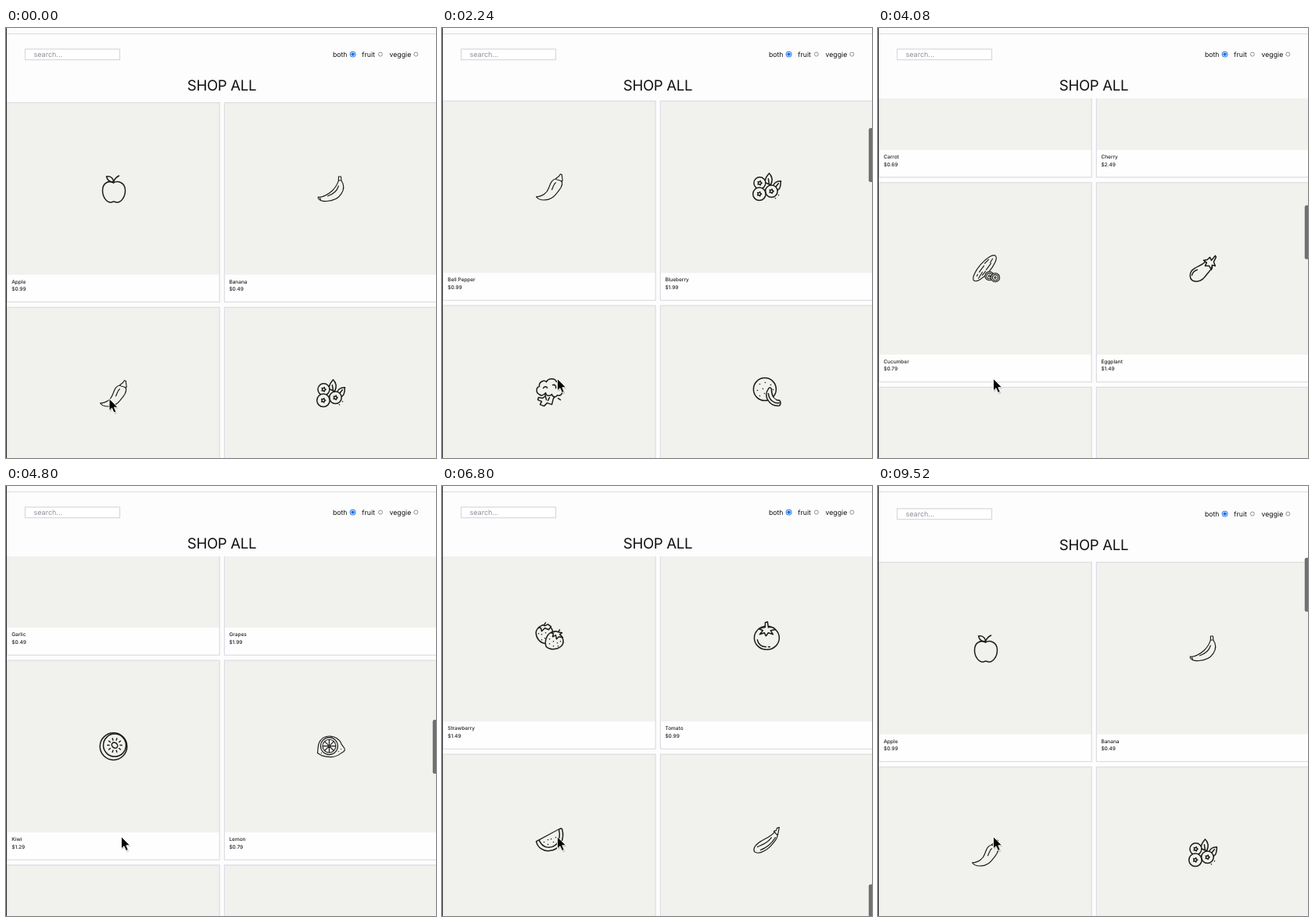
An HTML page for the animation above (9.6 s loop, 550 px wide and 550 px high).

```html
<!DOCTYPE html>
<html lang="en">
<head>
<meta charset="utf-8">
<title>Shop all</title>
<style>
  html, body { margin: 0; width: 100%; height: 100%; overflow: hidden; background: #fdfdfd; }
  svg { display: block; width: 550px; height: 550px; }
  text { font-family: Inter, Roboto, "Liberation Sans", sans-serif; fill: #111; text-rendering: geometricPrecision; }
  .label { font-size: 8.7px; }
  .item { font-size: 6.5px; font-weight: 500; fill: #222; }
  .icon { fill: #f1f1ed; stroke: #1c1c1c; stroke-width: 1.15; stroke-linecap: round; stroke-linejoin: round; }
  .bold { stroke-width: 1.5; }
</style>
</head>
<body>
<svg viewBox="0 0 550 550">
  <defs><clipPath id="view"><rect y="90" width="550" height="500"/></clipPath></defs>
  <rect width="550" height="550" fill="#fdfdfd"/>
  <g id="page">
    <rect x="24.5" y="27" width="121" height="13.6" fill="#fff" stroke="#d9dadf" stroke-width="1.3"/>
    <text x="35.5" y="36.8" style="font-size:9px;fill:#8c9099">search...</text>
    <text class="label" x="418" y="36.8">both</text>
    <text class="label" x="455.3" y="36.8">fruit</text>
    <text class="label" x="490.6" y="36.8">veggie</text>
    <circle cx="443.6" cy="33.6" r="3.4" fill="#fff" stroke="#3b82e8" stroke-width="1.1"/>
    <circle cx="443.6" cy="33.6" r="2.2" fill="#1c6fe6"/>
    <g fill="#fff" stroke="#777" stroke-width=".8">
      <circle cx="478.9" cy="33.6" r="2.5"/>
      <circle cx="524.3" cy="33.6" r="2.5"/>
    </g>
    <text x="276" y="80" text-anchor="middle" style="font-size:18.6px;letter-spacing:-.32px">SHOP ALL</text>
    <g clip-path="url(#view)"><g id="list"></g></g>
    <rect id="thumb" x="545.8" width="8" height="69" rx="2.5" fill="#707070"/>
  </g>
  <path d="M0 7.5H550" stroke="#dcdce0" stroke-width="1.2"/>
  <rect width="1" height="550" fill="#2c2c30"/>
  <g id="cursor">
    <path d="M1 2V17L4.6 13.8L7.2 20L10 18.8L7.4 12.8H12Z" fill="#000" opacity=".16"/>
    <path d="M0 0V15.4L3.5 12.2L6 18L8.8 16.8L6.3 11.2H11Z" fill="#050505" stroke="#fff" stroke-width=".9"/>
  </g>
</svg>
<script>
const LOOP = 9600, STEP = 80, PITCH = 261.8, TOP = 95.5;
const $ = id => document.getElementById(id);

// Path helpers
const oval = (x, y, rx, ry = rx, tilt = 0) => {
  const a = tilt * Math.PI / 180, dx = rx * Math.cos(a), dy = rx * Math.sin(a);
  const arc = s => `A${rx} ${ry} ${tilt} 0 1 ${x + s * dx} ${y + s * dy}`;
  return `M${x - dx} ${y - dy}${arc(1)}${arc(-1)}Z`;
};
const dots = (...xy) => xy.map((v, i) => i % 2 ? '' : `M${v} ${xy[i + 1]}h.1`).join('');
const spokes = (x, y, r0, r1, n) => Array.from({ length: n }, (_, i) => {
  const a = i / n * 2 * Math.PI, c = Math.cos(a), s = Math.sin(a);
  return `M${x + r0 * c} ${y + r0 * s}L${x + r1 * c} ${y + r1 * s}`;
}).join('');
const berry = (x, y, r) => [oval(x, y, r), oval(x, y, 1.9) + spokes(x, y, 1.9, 2.8, 5)];
const grape = (x, y) => oval(x, y, 4.6);

const items = [
  ['Apple', 0.99, [
    'M0-8C-5-11-14-9-14 2C-14 11-8 17-4 17C-2 17-1 16 .5 16C2 16 3 17 5 17C9 17 15 11 15 2C15-9 5-11 0-8Z',
    'M0-9C1-12 3-15 7-17', 'M0-9C-5-9-8-12-9-16C-4-17 0-14 0-9Z'], 'bold'],
  ['Banana', 0.49, [
    'M10-16H13L13.5-11C21 0 12 15-5 15.5C-11 16-17 14-16 10C-12 11-4 8 2 2C8-4 9-8 10-11Z',
    'M10-4C8 3 2 7-4 9M10-11H13M-14 11L-13 14']],
  ['Bell Pepper', 0.99, [
    'M9-11C2-10 1-4-1 1C-3 7-9 12-17 12C-13 18 1 18 8 9C13 3 17-1 16-7C15-11 12-12 9-11Z',
    'M8-11C10-13 12-13 14-17L16-16C15-14 18-10 16-7C14-10 11-8 8-11Z', 'M8-6C5-4 5-1 3 3']],
  ['Blueberry', 1.99, [
    'M-2-6C-3-12 1-15 3-18C7-14 8-9 5-3Z', 'M8-1C9-6 13-8 18-8C18-3 17 3 13 4Z', 'M3-4L2-11M11 0L15-5',
    ...berry(-9, -5.5, 7.5), ...berry(6, 5, 7.8), ...berry(-9.5, 8.5, 8.2), dots(11, 14, 15, 10)], 'bold'],
  ['Broccoli', 1.49, [
    'M-7-1L-5 5L-9 8L-14 7L-15 10L-10 12L-12 16L-7 18L-3 14L3 16L5 8L10 3Z',
    'M-13 3C-18 1-17-6-13-7C-14-13-7-16-4-13C-1-18 7-18 9-13C14-15 18-9 15-5C18-1 16 6 10 4C9 7 4 7 3 3C0 6-4 5-5 1C-8 5-11 5-13 3Z',
    'M-8-5C-6-8-3-7-3-5M4-9C7-10 9-7 8-5M-5 6L-4 10M0 7L-2 11M11 8L14 10'], 'bold'],
  ['Cantaloupe', 2.99, [
    oval(-2.5, -3.5, 14.5), dots(-9, -10, -2, -12, 5, -9, -12, -2, -5, -4, -9, 5, -3, 2, 8, -3),
    'M2-4C-5 6 4 19 16 17.5C18.5 15 18 12 16 10.5C9 11 6 4 6-4C5-6 3-6 2-4Z', 'M2 2C3 10 9 15 16 14'], 'bold'],
  ['Carrot', 0.69, [
    'M5-10C0-10-6 0-16 15C-15 17-14 17-13 16C0 9 10 2 11-4C11-8 8-10 5-10Z',
    'M7-9C5-14 8-17 9-17C11-14 10-11 9-8C12-13 16-12 17-11C15-8 12-6 9-8', 'M-4 0L0 3M0-5L4-2M-8 6L-5 8']],
  ['Cherry', 2.49, [
    oval(-8, 9, 8), oval(8, 8, 8), 'M-8 2C-6-7-1-13 4-16C3-9 5-3 8 1', 'M4-16C10-18 15-14 16-10C10-9 6-11 4-16Z']],
  ['Cucumber', 0.79, [
    oval(-1, -1, 21, 7, -49), 'M-9 12L-4 4M-8 4L-2-4M1 1L7-7M-1-7L4-12M6-8L9-13M-11 9L-10 7M-4 8L0 3',
    oval(5, 9, 5.6), oval(5, 9, 3.6), oval(5, 9, 1.2), oval(12.5, 11, 5.6), oval(12.5, 11, 3.6), oval(12.5, 11, 1.2)]],
  ['Eggplant', 1.49, [
    'M3-9C-1-5-5-4-10-1C-19 4-18 16-8 16C1 16 4 7 12-1L12-7Z',
    'M1-11L6-12L9-15L11-11L16-17L17-15L14-9L16-4L12-5L11 1L8-4L3-4L5-8Z', 'M-14 8C-13 4-10 2-7 1'], 'bold'],
  ['Garlic', 0.49, [
    'M-2-16C-1-8-14-5-14 5C-14 13-6 15 0 15C6 15 14 13 14 5C14-5 1-8 3-16Z', 'M0-9C-6 0-6 10 0 15C6 10 6 0 0-9']],
  ['Grapes', 1.99, [
    grape(-9, -5), grape(0, -5), grape(9, -5), grape(-5, 3), grape(5, 3), grape(0, 11),
    'M0-10V-16', 'M0-12C4-18 10-17 12-14C8-10 4-10 0-12Z']],
  ['Kiwi', 1.29, [
    oval(0, -.5, 17.3), oval(1.5, -2, 14.5), oval(1.5, -2, 4, 3.2, 40), spokes(1.5, -2, 7, 9.2, 10)], 'bold'],
  ['Lemon', 0.79, [
    'M-17 8C-16 3-17-2-14-7C-8-17 8-15 13-5C14-1 18 0 18 4C17 7 14 7 12 9C4 15-6 13-12 11Z',
    oval(-2, -1, 11), oval(-2, -1, 8.4), spokes(-2, -1, 1, 8, 8), dots(13, 3, 10, 6, -12, 8)]],
  ['Onion', 0.69, [
    'M-8-17H-5C-5-10 9-7 9 4C9 12 1 15-6 15C-13 15-17 10-17 4C-17-6-8-9-8-17Z', 'M-12-1C-14 4-13 8-11 10M-6-8L-7-4',
    'M15-9C13-4 18 0 17 7C16 13 11 16 6 16C0 16-4 11-3 6C-1-1 9-2 15-9Z',
    oval(7, 6, 7.2, 6.6), oval(7, 6.4, 4.4, 3.9), oval(7, 6.6, 1.5), 'M-7 15L-8 17M-5 15V17'], 'bold'],
  ['Orange', 0.79, [
    oval(-4, 1, 13.5), 'M-9-11C-13-15-9-18-4-16C0-18 3-15 0-13C-3-10-6-10-9-11Z',
    dots(-12, -1, -9, 3, -12, 6, -6, 7, -8, 11, -5, 0, -2, 11), 'M1-6C4-5 6-3 7 0',
    'M-1 16L15 5C19 10 17 17 11 18C6 19 2 18-1 16Z', 'M4 15L13 9C15 13 12 16 9 16C7 16 5 16 4 15ZM9 12L11 15']],
  ['Pear', 1.29, [
    'M0-9C-5-9-5-4-6-1C-7 3-10 5-10 9C-10 15-5 18 0 18C5 18 10 15 10 9C10 5 7 3 6-1C5-4 5-9 0-9Z',
    'M0-9C0-12 1-14 3-15', 'M-4-13C0-18 4-17 9-17C8-12 4-10 1-12', 'M7 9C7 12 5 14 3 15'], 'bold'],
  ['Pineapple', 1.99, [
    'M-8-5L-12-8L-6-9L-11-14L-4-12L0-18L4-12L11-14L6-9L12-8L8-5Z', 'M-4-6L0-12L4-6',
    'M-7-5H7C11-1 11 11 8 15C5 18-5 18-8 15C-11 11-11-1-7-5Z',
    'M-4-5L10 9M3-5L10 2M-9 0L7 16M-10 7L0 17M4-5L-10 9M-3-5L-10 2M9 0L-7 16M10 7L0 17'], 'bold'],
  ['Plum', 0.99, [
    'M0-9C-7-12-13-6-12 3C-11 11-5 16 0 16C6 16 11 10 11 3C11-7 5-11 0-9Z',
    'M0-9C3-4 4 3 1 10M0-9C0-12 2-14 4-15', 'M2-10C2-16 7-17 13-16C12-10 8-7 2-10Z']],
  ['Potato', 0.59, [
    'M-13 10C-19 7-18-2-13-4C-12-13-3-18 4-13C10-9 9-1 6 3C0 10-8 13-13 10Z',
    'M-6 9C-8 2 0-3 7-2C14-4 19 1 17 8C15 14 8 15 3 14C-1 14-5 13-6 9Z',
    dots(-8, -7, -2, -11, 2, -7, -12, 2, -9, 6, -4, -2) + 'M1 5L4 4M9 2L12 3M5 10L8 9M12 9L13 7']],
  ['Pumpkin', 2.49, [
    oval(-7, 4, 9, 12), oval(7, 4, 9, 12), oval(0, 4, 7, 12), 'M-2-8L0-16L4-15L2-8Z']],
  ['Raspberry', 2.99, [
    'M-11-7C-15 4-5 17 0 17C5 17 15 4 11-7Z', grape(-6, -2), grape(6, -2), grape(0, 5), 'M-11-7L-5-12L0-8L5-12L11-7L0-4Z']],
  ['Strawberry', 1.49, [
    'M-13-11C-19-8-18 0-14 5C-11 9-6 10-2 10C4 7 6-3 3-9C0-14-8-14-13-11Z',
    'M-7-14L-5-17M-14-11L-9-14L-6-13L-2-15L2-12L-1-8L-6-10L-10-6L-11-10Z', dots(-14, -3, -10, -2, -10, 5, -6, 3, -5, -4),
    'M1-4C-4-1-7 8-4 14C1 19 12 17 16 12C20 6 16-1 10-4C7-6 4-6 1-4Z',
    'M11-5L13-8M2-4L8-6L11-5L16-4L13-2L17 2L12 1L9 4L8-1L4 1L5-3Z', dots(0, 4, 0, 10, 5, 7, 5, 13, 10, 9, 11, 13, 14, 7)], 'bold'],
  ['Tomato', 0.99, [
    oval(0, 2.5, 16, 15), 'M-10-9C-6-11-4-11-2-11L-2-17L1-18L2-11C5-12 9-11 11-8L5-7L8-2L2-4L-1 0L-3-4L-9-2L-5-7Z',
    'M-12 5C-11 11-6 14-1 14M2 14H4'], 'bold'],
  ['Watermelon', 2.99, [
    'M-17 1L14-15.5L16-15C20-2 13 12 0 13C-8 14-15 9-17 1Z', 'M-13 0C-9 9 0 11 7 6C13 2 14-7 12-14',
    dots(-7, 2, -2, 5, 2, -2, 5, 2, 8, -4, -2, -1)], 'bold'],
  ['Zucchini', 0.99, [
    'M10-11C6-6 1-4-6 0C-13 4-18 9-16 14C-12 18-2 14 4 8C10 2 14-3 14-8Z',
    'M9-12L12-13L13-16L16-17L15-12L14-7C12-8 11-10 9-12Z', 'M6-4C1 3-5 5-12 8M11-4C6 4 0 9-8 12']],
];

$('list').innerHTML = items.map(([name, price, paths, look = ''], i) => {
  const x = i % 2 ? 279.4 : 1.2, y = TOP + (i >> 1) * PITCH, mid = i % 2 ? 136 : 136.3;
  return `<g transform="translate(${x} ${y})">
    <rect width="272" height="255" fill="#fefefe"/>
    <rect width="272" height="220" fill="#f1f1ed"/>
    <rect width="272" height="255" fill="none" stroke="#dcdce4" stroke-width="1.2"/>
    <g class="icon ${look}" transform="translate(${mid} 110.5)">${paths.map(d => `<path d="${d}"/>`).join('')}</g>
    <text class="item" x="6" y="231.2">${name}</text>
    <text class="item" x="6" y="240.7">$${price.toFixed(2)}</text>
  </g>`;
}).join('');

// [ms, scroll position]; negative values are the bounce at the top
const scroll = [
  [0, 0], [800, 0], [2240, 264], [4080, 945], [5520, 2020], [6800, 2894], [6880, 2904], [6960, 2904],
  [8080, 1677], [9040, 8], [9120, -10], [9200, -13], [9280, -10], [9360, -6.5], [9440, -4], [9520, -2], [9600, -1],
];
const rate = scroll.slice(1).map(([t, v], i) => (v - scroll[i][1]) / (t - scroll[i][0]));
const slope = scroll.map((_, i) => {
  const a = rate[i - 1] || 0, b = rate[i] || 0;
  return a * b > 0 ? 2 * a * b / (a + b) : 0;
});

// Monotone cubic through the table
function scrollAt(t) {
  const i = Math.max(0, scroll.findIndex(k => k[0] > t) - 1);
  const [t0, v0] = scroll[i], [t1, v1] = scroll[i + 1];
  const h = t1 - t0, u = (t - t0) / h, w = 1 - u;
  return v0 * (1 + 2 * u) * w * w + v1 * u * u * (3 - 2 * u) + h * u * w * (slope[i] * w - slope[i + 1] * u);
}

const move = (el, x, y) => el.setAttribute('transform', `translate(${x} ${y})`);

function draw(t) {
  const s = scrollAt(t), inside = Math.max(0, s);
  move($('page'), 0, Math.max(0, -s));
  move($('list'), 0, -inside);
  $('thumb').setAttribute('y', 89.8 + inside * 0.145);
  $('thumb').setAttribute('visibility', t >= 880 ? 'visible' : 'hidden');
  const u = Math.min(1, t / 640), e = u * u * (3 - 2 * u);
  move($('cursor'), 132 + 15.5 * e, 474 - 25.5 * e);
}

const start = performance.now();
function tick() {
  const t = (performance.now() - start) % LOOP;
  draw(Math.floor(t / STEP) * STEP);
  requestAnimationFrame(tick);
}
draw(0);
requestAnimationFrame(tick);
</script>
</body>
</html>
```
